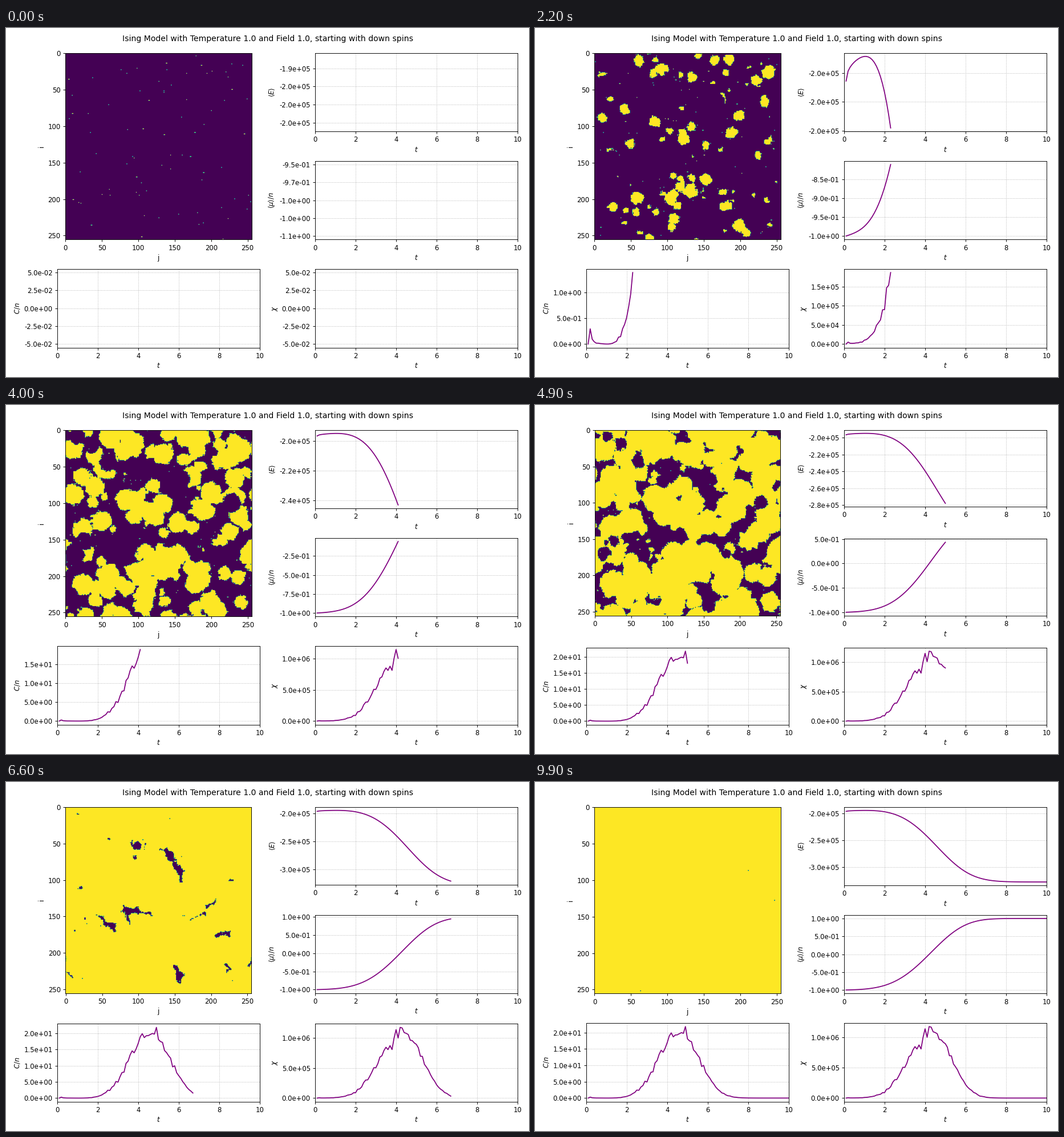
A matplotlib script for the animation above (10000 ms loop, 917x611 px).

```python
import numpy as np
import matplotlib.pyplot as plt
from matplotlib.animation import FuncAnimation
from matplotlib.ticker import FormatStrFormatter

N = 256
FRAMES = 100
DPI = 83.9
SPEED = 4  # cells a domain wall moves per unit of time
plt.rcParams["font.family"] = "DejaVu Sans"
rng = np.random.default_rng(4)


def up_share(t):
    """Nucleation and growth: share of spins that have turned up."""
    return 1 - np.exp(-.0085 * (t - .1) - .004 * t**3 - .001154 * t**4)


def fluctuation(rate, scale):
    """Variance of a drifting observable, with sampling noise."""
    spread = .06 + .2 * np.exp(-time)
    noisy = scale * rate**2 * (1 + spread * rng.standard_normal(FRAMES))
    return noisy * (time > .1)


# ---- observables: energy is bonds, field and domain walls ----
time = np.arange(1, FRAMES + 1) / 10
share = up_share(time)
mag = 2 * share - 1
walls = .51 * share**.52 * (1 - share)**.62
energy = N * N * (walls - 4 - mag)
heat = fluctuation(np.gradient(energy / N**2, time), 57)
chi = fluctuation(np.gradient(mag, time), 3.45e6)
chi[1:] += 4e3 * np.exp(-(time[1:] - .2) / .05)

# ---- time at which each spin turns up ----
# column, row, radius of the largest early domains and of the last ones
early = [(131, 189, 9), (92, 21, 8), (58, 199, 8), (238, 27, 8), (60, 11, 7),
         (83, 95, 7), (122, 117, 7), (184, 9, 7), (222, 38, 7), (199, 87, 7),
         (188, 109, 7), (153, 173, 7), (109, 227, 7), (40, 77, 6),
         (177, 210, 6), (165, 10, 6)]
late = [(98, 53, 11), (94, 70, 8), (59, 44, 7), (36, 20, 6), (16, 9, 5),
        (159, 68, 7), (227, 100, 7), (222, 224, 7), (12, 170, 7),
        (26, 152, 6), (180, 170, 5), (210, 178, 6), (80, 179, 4)]
row, col = np.mgrid[:N, :N]


def distance(x, y):
    """Distance on the periodic lattice."""
    dx, dy = ((d + N / 2) % N - N / 2 for d in (col - x, row - y))
    return np.hypot(dx, dy)


def rough(n):
    """Periodic noise, smooth over n cells."""
    a = rng.standard_normal((N, N))
    for axis in (0, 1):
        a = sum(np.roll(a, k - n // 2, axis) for k in range(n))
    return a / a.std()


nuclei = [(x, y, 2.3 - r / SPEED) for x, y, r in early]
nuclei += list(rng.uniform((0, 0, .5), (N, N, 6), (230, 3)))

turn = np.full((N, N), 9.)
for x, y, birth in nuclei:
    turn = np.minimum(turn, birth + distance(x, y) / SPEED)
for x, y, r in late:
    turn = np.maximum(turn, 5.7 + (r - distance(x, y)) / SPEED)
turn += .2 * rough(5) + .2 * rough(9)
levels = np.sort(turn, axis=None)


def spins(k):
    """Grown domains plus thermal flips."""
    grown = up_share(time[k] + .1) - .0015 * (1 - share[k])
    count = int(np.clip(np.rint(grown * N * N), 0, N * N - 1))
    up = turn <= levels[count] if count else np.zeros((N, N), bool)
    r = np.random.default_rng(100 + k)
    flip = r.random((N, N)) < np.where(up, 4e-5, .0014)
    flip |= np.roll(flip, 1, 1) & ~up & (r.random((N, N)) < .2)
    return np.where(up ^ flip, 1, -1)


# ---- figure ----
fig = plt.figure(figsize=(917.01 / DPI, 611.01 / DPI), dpi=DPI)
grid = fig.add_gridspec(3, 2)
fig.suptitle("Ising Model with Temperature 1.0 and Field 1.0, "
             "starting with down spins")

lattice = fig.add_subplot(grid[:2, 0])
image = lattice.imshow(spins(0), vmin=-1, vmax=1)
lattice.set(xlabel="j", ylabel="i")


def plot(cell, label, values):
    ax = fig.add_subplot(cell)
    line, = ax.plot([], [], color="purple")
    ax.set(xlim=(0, 10), xlabel="$t$", ylabel=label)
    ax.yaxis.set_major_formatter(FormatStrFormatter("%.1e"))
    ax.grid(linestyle=":")
    return ax, line, values


plots = [plot(grid[0, 1], r"$\langle E \rangle$", energy),
         plot(grid[1, 1], r"$\langle \mu \rangle / n$", mag),
         plot(grid[2, 0], r"$C/n$", heat),
         plot(grid[2, 1], r"$\chi$", chi)]


def update(k):
    image.set_data(spins(k))
    for ax, line, values in plots:
        line.set_data(time[:k + 1], values[:k + 1])
        ax.relim()
        ax.autoscale_view(scalex=False)
    fig.tight_layout()
    return []


anim = FuncAnimation(fig, update, frames=FRAMES, interval=100,
                     init_func=lambda: update(0), repeat=True, repeat_delay=0)
plt.show()
```
